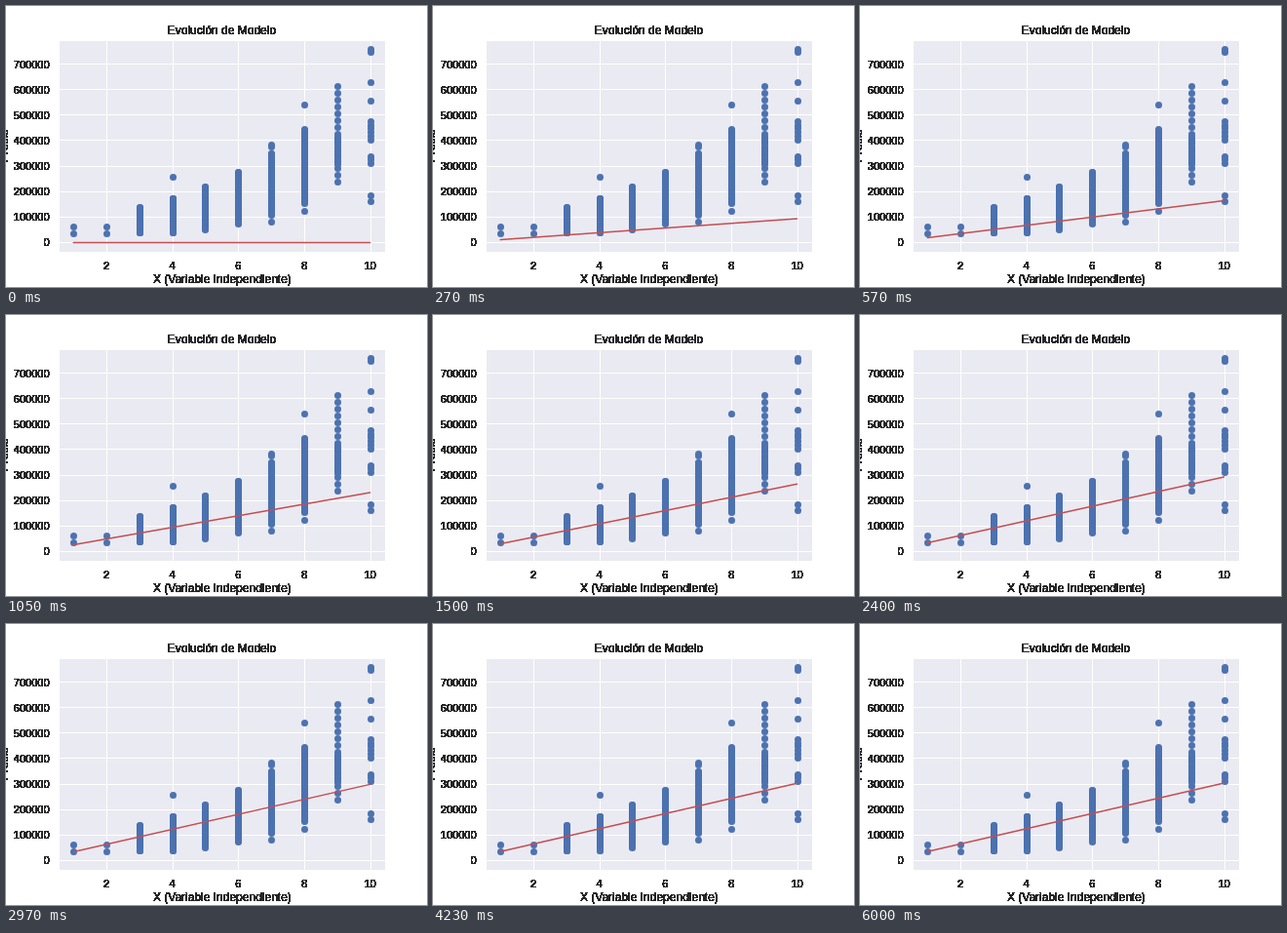
Recreate the animation shown at these times as an HTML page with a canvas. Size 432 by 288 pixels, loop 6.03 s.

```html
<!DOCTYPE html>
<html lang="es">
<head>
<meta charset="utf-8">
<title>Evolución de Modelo</title>
<style>
html, body { margin: 0; width: 100%; height: 100%; overflow: hidden; background: #fff; }
canvas { display: block; }
</style>
</head>
<body>
<canvas id="stage" width="432" height="288"></canvas>
<script>
const W = 432, H = 288;
const LOOP = 6030, STEP = 30;
const FONT = '"Liberation Sans", Arial, sans-serif';
const BLUE = '#4c72b0', RED = '#c44e52';
const plot = { x: 55, y: 36, w: 334, h: 216 };

// Prices are in hundreds of thousands.
const xPos = v => 69.21 + (v - 1) * 33.818;
const yPos = price => 242.4 - price * 26.12;

function layer() {
  const c = document.createElement('canvas');
  c.width = W;
  c.height = H;
  return c;
}

function drawGrid(g) {
  g.fillStyle = '#eaeaf2';
  g.fillRect(plot.x, plot.y, plot.w, plot.h);
  g.fillStyle = '#fff';
  for (let v = 2; v <= 10; v += 2) g.fillRect(Math.round(xPos(v)), plot.y, 1, plot.h);
  for (let p = 0; p <= 7; p++) g.fillRect(plot.x, Math.floor(yPos(p)), plot.w, 1);
}

// Markers sit on pixel centres, evenly spread between two prices.
function spread(g, v, high, low = high, count = 1) {
  const x = Math.round(xPos(v)) + 0.5;
  g.fillStyle = BLUE;
  for (let i = 0; i < count; i++) {
    const price = high - (high - low) * i / Math.max(1, count - 1);
    g.beginPath();
    g.arc(x, Math.floor(yPos(price)) + 0.5, 3.5, 0, Math.PI * 2);
    g.fill();
  }
}

function drawMarkers(g) {
  for (const v of [1, 2]) spread(g, v, 0.6, 0.35, 2);

  // Dense columns: the ceiling grows exponentially, the floor quadratically.
  for (let v = 3; v <= 8; v++) {
    spread(g, v, 1.37 * 1.264 ** (v - 3), 0.36 + 0.055 * (v - 3.4) ** 2, 90);
  }
  spread(g, 4, 2.55);
  spread(g, 7, 3.82, 3.73, 2);
  spread(g, 7, 0.8);
  spread(g, 8, 5.4);
  spread(g, 8, 1.22);

  spread(g, 9, 6.13, 2.37, 15);
  spread(g, 9, 4.15, 3.04, 12);

  spread(g, 10, 7.57, 7.46, 2);
  spread(g, 10, 6.28, 5.55, 2);
  spread(g, 10, 4.75, 4.02, 6);
  spread(g, 10, 3.37, 3.1, 3);
  spread(g, 10, 1.84, 1.61, 2);
}

// Labels have hard edges: every touched pixel becomes solid.
function makeLabels() {
  const c = layer();
  const g = c.getContext('2d', { willReadFrequently: true });
  const put = (text, x, y, size, align = 'center') => {
    g.font = `${size}px ${FONT}`;
    g.textAlign = align;
    g.fillText(text, x, y);
  };
  g.fillStyle = '#262626';
  put('Evolución de Modelo', 221.4, 29, 12);
  put('X (Variable Independiente)', 221.9, 284, 12);
  for (let v = 2; v <= 10; v += 2) put(v, xPos(v), 270, 11);
  for (let p = 0; p <= 7; p++) put(p * 100000, 44.5, Math.round(yPos(p)) + 4, 11, 'right');
  g.translate(2, 143.3);
  g.rotate(-Math.PI / 2);
  put('Precio', 0, 0, 12);

  const image = g.getImageData(0, 0, W, H), px = image.data;
  for (let i = 0; i < px.length; i += 4) {
    px[i] = px[i + 1] = px[i + 2] = 38;
    px[i + 3] = px[i + 3] > 6 ? 255 : 0;
  }
  g.putImageData(image, 0, 0);
  return c;
}

const chart = layer();
const chartCtx = chart.getContext('2d');
chartCtx.fillStyle = '#fff';
chartCtx.fillRect(0, 0, W, H);
drawGrid(chartCtx);
drawMarkers(chartCtx);
chartCtx.drawImage(makeLabels(), 0, 0);

const ctx = document.getElementById('stage').getContext('2d');
ctx.strokeStyle = RED;
ctx.lineWidth = 1.5;
ctx.lineCap = 'round';

// Gradient descent: the remaining error shrinks 4% per step.
function draw(now) {
  const step = Math.floor((now % LOOP) / STEP);
  const fit = 1 - 0.96 ** step;
  ctx.drawImage(chart, 0, 0);
  ctx.beginPath();
  ctx.moveTo(xPos(1), yPos(0.35 * fit));
  ctx.lineTo(xPos(10), yPos(3.04 * fit));
  ctx.stroke();
}

const start = performance.now();
function tick() {
  draw(performance.now() - start);
  requestAnimationFrame(tick);
}
tick();
</script>
</body>
</html>
```
